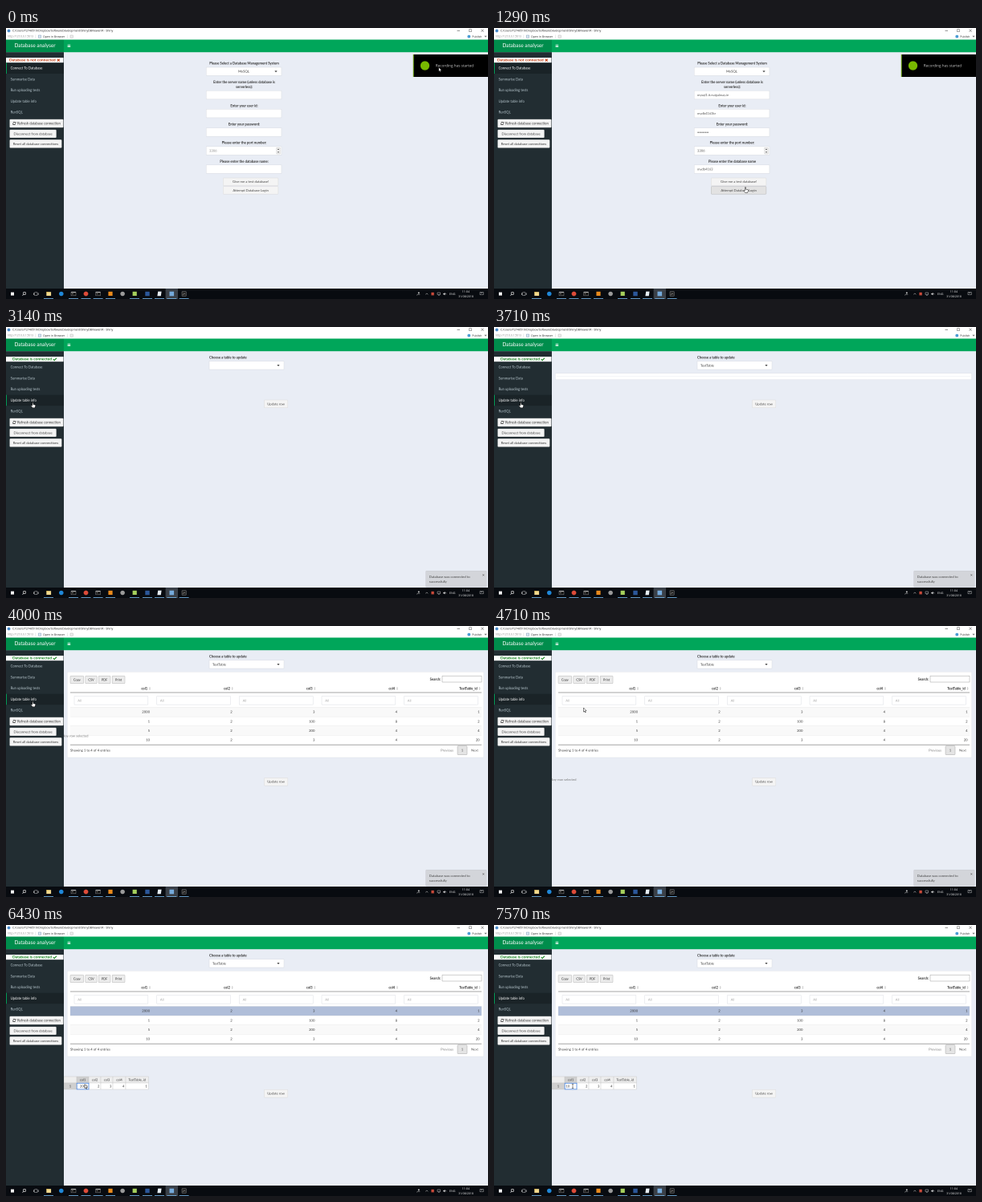
An HTML page with a canvas for the animation above (8000 ms loop, 600x338 px).

```html
<!DOCTYPE html>
<html lang="en">
<head>
<meta charset="utf-8">
<title>Database analyser</title>
<style>
html, body { margin: 0; width: 100%; height: 100%; overflow: hidden; background: #e9edf5; }
canvas { display: block; width: 600px; height: 338px; }
</style>
</head>
<body>
<canvas id="stage"></canvas>
<script>
const LOOP = 8000, STEP = 1000 / 7, SCALE = 2;
const canvas = document.getElementById('stage');
canvas.width = 600 * SCALE;
canvas.height = 338 * SCALE;
const c = canvas.getContext('2d');

const UI = 'Lato, "Open Sans", sans-serif', SYS = '"Open Sans", "Noto Sans", sans-serif';
const INK = '#333', BACK = '#e9edf5', GREEN = '#00a65a', DARK = '#222d32';

function rect(x, y, w, h, color) {
  c.fillStyle = color;
  c.fillRect(x, y, w, h);
}
function box(x, y, w, h, fill, stroke, r = 0) {
  c.beginPath();
  c.roundRect(x, y, w, h, r);
  if (fill) { c.fillStyle = fill; c.fill(); }
  if (stroke) { c.strokeStyle = stroke; c.lineWidth = 0.4; c.stroke(); }
}
function disc(x, y, r, color) {
  c.fillStyle = color;
  c.beginPath();
  c.arc(x, y, r, 0, 7);
  c.fill();
}
function poly(pts, fill, stroke, width = 0.5) {
  c.beginPath();
  pts.forEach(([x, y], i) => i ? c.lineTo(x, y) : c.moveTo(x, y));
  if (fill) { c.closePath(); c.fillStyle = fill; c.fill(); }
  if (stroke) { c.strokeStyle = stroke; c.lineWidth = width; c.stroke(); }
}
// Type is laid out large and scaled down so that letter spacing stays exact.
function text(s, x, y, { size = 4.2, color = INK, align = 'left', bold = false, font = UI } = {}) {
  c.save();
  c.translate(x, y + size * 0.33);
  c.scale(0.1, 0.1);
  c.font = `${bold ? 'bold ' : ''}${size * 10}px ${font}`;
  c.textAlign = align;
  c.fillStyle = color;
  c.fillText(s, 0, 0);
  c.restore();
}
const label = (s, x, y, align = 'center') => text(s, x, y, { bold: true, align });
function button(s, x, y, w, h, { fill = '#f4f4f4', edge = '#d5d5d5', color = '#444', size = 4.2 } = {}) {
  box(x, y, w, h, fill, edge, 0.8);
  text(s, x + w / 2, y + h / 2, { align: 'center', color, size });
}
function caret(x, y, color = INK) {
  poly([[x - 1.6, y - 0.8], [x + 1.6, y - 0.8], [x, y + 1.1]], color);
}

function titleBar() {
  rect(0, 0, 600, 14.5, '#fff');
  disc(3.5, 3.5, 1.9, '#4a8ac9');
  text('C:/Users/T2740519/Dropbox/SoftwareDevelopment/ShinyDBViewer/R - Shiny', 8, 3.3, { size: 3.5, font: SYS, color: '#222' });
  rect(561.5, 3.2, 3.5, 0.5, '#333');
  box(576.5, 1.7, 3, 3, null, '#333');
  poly([[591.5, 1.7], [594.7, 4.9]], null, '#333');
  poly([[594.7, 1.7], [591.5, 4.9]], null, '#333');
  text('http://127.0.0.1:5013', 2, 10.6, { size: 3.3, font: SYS, color: '#888' });
  rect(36.7, 8.5, 0.4, 4.5, '#ccc');
  box(40.2, 9, 3.6, 3.2, '#dce7f2', '#6f8eac');
  text('Open in Browser', 46, 10.6, { size: 3.5, font: SYS });
  rect(76, 8.5, 0.4, 4.5, '#ccc');
  box(80, 9, 3.4, 3.2, '#eee', '#aaa');
  disc(576.3, 10.6, 1.9, '#4a9bd4');
  text('Publish', 580.3, 10.6, { size: 3.5, font: SYS });
  caret(597, 10.6, '#777');
}

function header() {
  rect(72, 14.5, 528, 15.7, GREEN);
  rect(0, 14.5, 72, 15.7, '#008d4c');
  text('Database analyser', 36, 22, { size: 6.4, color: '#fff', align: 'center' });
  for (let i = 0; i < 3; i++) rect(76.6, 20.7 + i * 1.3, 3.6, 0.7, '#fff');
}

function sidebar(n) {
  rect(0, 30.2, 72, 294.8, DARK);
  rect(0, 37, 71.5, 6.2, '#fff');
  if (n < 10) {
    const red = '#c63d12';
    text('Database is not connected', 4, 40, { size: 4.9, bold: true, color: red });
    poly([[63.8, 38.6], [66.8, 41.6]], null, red, 1);
    poly([[66.8, 38.6], [63.8, 41.6]], null, red, 1);
  } else {
    const ok = '#13851b';
    text('Database is connected', 8, 40, { size: 4.9, bold: true, color: ok });
    poly([[58.8, 40.2], [60.2, 41.6], [63, 38.6]], null, ok, 1.1);
  }
  const active = n < 21 ? 0 : 3;
  ['Connect To Database', 'Summarise Data', 'Run uploading tests', 'Update table info', 'RunSQL'].forEach((s, i) => {
    const y = 50.2 + i * 13.75;
    const lit = i === active || (i === 3 && n >= 15 && n < 31);
    if (lit) {
      rect(0, y - 6.8, 72, 13.6, '#1a2327');
      rect(0, y - 6.8, 0.9, 13.6, GREEN);
    }
    text(s, 5.6, y, { size: 4.25, color: lit ? '#fff' : '#b8c7ce' });
  });
  box(4.7, 114, 66.6, 10, '#f4f4f4', '#ddd', 0.8);
  c.strokeStyle = '#222';
  c.lineWidth = 0.7;
  for (const a of [0.3, 3.44]) {
    c.beginPath();
    c.arc(10.3, 119, 1.6, a, a + 2.4);
    c.stroke();
  }
  poly([[11, 118.6], [12.5, 118.6], [12.5, 117.1]], '#222');
  poly([[9.6, 119.4], [8.1, 119.4], [8.1, 120.9]], '#222');
  text('Refresh database connection', 14, 119, { size: 4.25 });
  button('Disconnect from database', 4.7, 127, 57.8, 9.8, { color: INK });
  button('Reset all database connections', 4.7, 139.4, 64.5, 10, { color: INK });
}

function loginPage(n) {
  const full = n >= 6;
  const field = (y, s, color = '#555') => {
    box(249.3, y, 93.6, 10.6, '#fff', '#d2d6de');
    text(s, 253, y + 5.4, { color, size: 4.1 });
  };
  label('Please Select a Database Management System', 296.5, 44);
  box(249.3, 49, 93.6, 10.4, '#fff', '#d2d6de');
  text('MySQL', 296, 54.2, { align: 'center' });
  caret(336, 54.2);
  label('Enter the server name (unless database is', 296.5, 67.8);
  label('serverless):', 296.5, 73.6);
  field(78.2, full ? 'mysql1.it.nuigalway.ie' : '');
  label('Enter your user id:', 296.5, 97);
  field(101.3, full ? 'mydb4163kr' : '');
  label('Enter your password:', 296.5, 120);
  field(124.6, full ? '••••••' : '');
  label('Please enter the port number:', 296.5, 143);
  field(147.8, '3306', full ? '#555' : '#888');
  box(336.8, 149.2, 4.4, 7.8, '#eee', '#bbb');
  poly([[338, 152], [340, 152], [339, 150.6]], '#333');
  poly([[338, 154.4], [340, 154.4], [339, 155.8]], '#333');
  label('Please enter the database name' + (full ? '' : ':'), 296.5, 166.4);
  field(170.8, full ? 'mydb4163' : '');
  const hover = { fill: '#e2e2e2', edge: '#adadad' };
  button('Give me a test database!', 270.3, 187, 68.6, 9.6, n >= 4 && n < 7 ? hover : {});
  button('Attempt Database Login', 270.3, 197.6, 68.6, 9.6, n >= 7 ? hover : {});
}

const COLS = [
  ['col1', 179, ['2000', '1', '5', '10']],
  ['col2', 281.7, ['2', '2', '2', '2']],
  ['col3', 384.4, ['3', '100', '200', '3']],
  ['col4', 487, ['4', '8', '4', '4']],
  ['TestTable_id', 589.6, ['1', '2', '4', '20']]
];

function dataTable(chosen) {
  box(76.3, 57.3, 518.4, 106.7, '#fff', '#dde0e6', 0.8);
  const small = { size: 3.9, fill: '#ececec', edge: '#aaa', color: '#222' };
  [['Copy', 80, 16.6], ['CSV', 98.8, 14.4], ['PDF', 115.2, 14.8], ['Print', 132.2, 15.8]]
    .forEach(([s, x, w]) => button(s, x, 62.2, w, 9.6, small));
  label('Search:', 541.3, 66.4, 'right');
  box(543, 62.2, 49, 7.8, '#fff', '#888');
  rect(80, 101.4, 512, 11.6, chosen ? '#b0bed9' : '#f9f9f9');
  rect(80, 124.7, 512, 11.6, '#f9f9f9');
  for (let i = 0; i < 4; i++) rect(80, 101.3 + i * 11.65, 512, 0.3, '#ddd');
  rect(80, 82.8, 512, 0.4, '#222');
  rect(80, 147.9, 512, 0.4, '#222');
  for (const [name, x, values] of COLS) {
    label(name, x - 2.8, 78, 'right');
    poly([[x - 0.9, 77.6], [x + 0.9, 77.6], [x, 75.9]], '#bbb');
    poly([[x - 0.9, 78.4], [x + 0.9, 78.4], [x, 80.1]], '#bbb');
    box(x - 94, 87.6, 91.8, 10.5, '#fff', '#d2d6de');
    text('All', x - 89.8, 93, { color: '#aaa', size: 4.1 });
    values.forEach((v, i) => text(v, x, 107.3 + i * 11.65, { align: 'right' }));
  }
  text('Showing 1 to 4 of 4 entries', 80, 155);
  text('Previous', 557, 155, { align: 'right', color: '#777' });
  button('1', 562, 149.6, 12, 11, { fill: '#e4e4e4', edge: '#999' });
  text('Next', 579, 155, { color: '#555' });
}

function rowTable(n) {
  const picked = n >= 44, edges = [72, 88, 103, 118, 133, 149, 177.4];
  const names = ['', 'col1', 'col2', 'col3', 'col4', 'TestTable_id'];
  const values = ['1', n < 46 ? '2000' : '', '2', '3', '4', '1'];
  names.forEach((s, i) => {
    const x = edges[i], w = edges[i + 1] - x;
    box(x, 189, w, 8, picked && i === 1 ? '#cfcfcf' : '#eee', '#c4c4c4');
    box(x, 197, w, 8, i ? '#fff' : picked ? '#cfcfcf' : '#eee', '#c4c4c4');
    text(s, x + w / 2, 193, { align: 'center', size: 4.1 });
    if (i) text(values[i], x + w - 1.6, 201, { align: 'right', size: 4.1 });
    else text('1', x + w / 2, 201, { align: 'center', size: 4.1 });
  });
  if (picked) {
    c.strokeStyle = '#4a86e0';
    c.lineWidth = 0.8;
    c.strokeRect(88.2, 197.3, 14.8, 7.6);
  }
  if (n >= 46) text(n < 53 ? '2000' : '10', 89.5, 201, { size: 4.1 });
}

function updatePage(n) {
  text('Choose a table to update', 253, 38, { bold: true });
  box(253, 42.6, 93, 10.4, '#fff', '#d2d6de');
  if (n >= 23) text('TestTable', 257, 47.9);
  caret(339, 47.9);
  let y = 91;
  if (n >= 28) {
    dataTable(n >= 35);
    y = n < 35 ? 189.4 : 205.3;
    if (n < 35) {
      c.save();
      c.beginPath();
      c.rect(72, 60, 200, 160);
      c.clip();
      text('Any row selected', 102.5, n < 31 ? 137 : 191.5, { align: 'right', color: '#777' });
      c.restore();
    } else rowTable(n);
  } else if (n >= 25) {
    box(76.3, 57.6, 518.4, 8.2, '#fff', '#d5d9e2', 0.8);
    rect(78, 61.6, 515, 0.3, '#dfe2ea');
  }
  button('Update row', 321.4, y, 29.4, 9.8);
}

function notice(n) {
  if (n < 11 || n >= 43) return;
  c.globalAlpha = n === 42 ? 0.4 : n === 41 ? 0.75 : 1;
  box(522.6, 304.2, 75.6, 20, '#d3d5da', '#c3c5ca', 0.8);
  text('Database was connected to', 526.8, 311.4, { color: '#444' });
  text('successfully', 526.8, 317.4, { color: '#444' });
  text('×', 594.3, 309.3, { size: 5, bold: true, align: 'center', color: '#555' });
  c.globalAlpha = 1;
}

function toast(n) {
  if (n > 15) return;
  const lime = '#78b900';
  const left = n < 14 ? 506.8 : n === 14 ? 548 : 592;
  rect(left, 33, 600 - left, 28, lime);
  const inner = n < 13 ? 508 : n === 13 ? 552 : 600;
  rect(inner, 33, 600 - inner, 28, '#000');
  if (n >= 13) return;
  for (let y = 33.5; y < 61; y += 2) rect(506.8, y, 1.2, 0.9, '#20320a');
  disc(521.5, 47, 5.6, lime);
  text('Recording has started', 534.8, 47.2, { size: 4.66, font: SYS, color: '#ccc' });
}

function taskbar() {
  rect(0, 325, 600, 13, '#080b10');
  rect(198.6, 325, 15.4, 13, '#3a4048');
  rect(6, 329.6, 4, 4, '#f2f2f2');
  c.strokeStyle = '#eee';
  c.lineWidth = 0.6;
  c.beginPath();
  c.arc(23, 331, 1.7, 0, 7);
  c.stroke();
  poly([[21.8, 332.3], [20.4, 333.8]], null, '#eee', 0.6);
  box(35.6, 329.8, 3.4, 3.8, null, '#eee');
  rect(34.3, 330.4, 0.6, 2.6, '#eee');
  rect(39.8, 330.4, 0.6, 2.6, '#eee');
  rect(50.3, 329.2, 5.8, 4.8, '#f2d98c');
  rect(50.3, 329, 2.4, 0.9, '#d9b44a');
  disc(68.8, 331.5, 2.8, '#1f87d8');
  for (const x of [84, 114.6]) {
    box(x - 3, 329.2, 6, 4.6, '#111', '#aaa');
    rect(x - 2.8, 329.2, 5.6, 0.9, '#ccc');
    rect(x - 2, 331.2, 1.8, 0.5, '#ddd');
  }
  disc(99.5, 331.5, 2.9, '#dd4b39');
  rect(127.4, 328.8, 5.2, 5.2, '#e98a1c');
  disc(145.1, 331.5, 2.8, '#9a9a9a');
  rect(157.6, 328.8, 5.2, 5.2, '#a5cf5c');
  rect(173.3, 328.8, 5.4, 5.4, '#2b579a');
  poly([[189.2, 328.6], [193.6, 328.6], [192.8, 334.3], [188.4, 334.3]], '#e6edf2');
  rect(203.5, 328.7, 5.6, 5.6, '#75aadb');
  box(219, 328.8, 5.2, 5.4, '#222', '#aaa');
  poly([[220, 333], [221.6, 331], [223.3, 332]], null, '#ddd', 0.4);
  for (const x of [53, 84, 99.5, 114.6, 130, 160, 176, 191, 206.3, 221.6]) rect(x - 6, 337.2, 12, 0.8, '#76b9ed');

  const sys = { size: 3.7, font: SYS, color: '#eee', align: 'center' };
  disc(513.8, 330.4, 1, '#ccc');
  poly([[511.3, 333.5], [512.3, 332.2], [515.3, 332.2]], null, '#ccc');
  poly([[522.3, 332.4], [523.8, 330.9], [525.3, 332.4]], null, '#eee');
  rect(529.4, 329.8, 3.4, 3.6, '#c94a3a');
  box(537, 330, 3.6, 2.6, null, '#eee');
  rect(538.2, 333.1, 1.4, 0.5, '#eee');
  poly([[544.4, 331], [545.3, 331], [546.5, 330], [546.5, 333.4], [545.3, 332.4], [544.4, 332.4]], '#eee');
  poly([[547.2, 331], [548.2, 332.2]], null, '#eee');
  text('ENG', 555.7, 331.7, sys);
  text('11:04', 572.4, 328.6, sys);
  text('31/08/2018', 572.6, 334.7, { ...sys, size: 3.5 });
  box(590, 329.4, 4.2, 3.4, null, '#eee');
  rect(591, 330.6, 2.2, 0.4, '#eee');
}

// Pointer tip: frame step, x, y
const PATH = [
  [0, 538.6, 49], [1, 478, 84], [2, 394, 142], [3, 330, 180], [4, 312.5, 188.5], [6, 312.5, 188.5],
  [7, 312.5, 198.6], [12, 312.5, 198.6], [13, 240, 168], [14, 122, 116], [15, 57.5, 88],
  [20, 36, 93], [21, 32.8, 94], [30, 32.8, 94], [31, 72, 98], [33, 151, 106], [39, 151, 106],
  [40, 151, 133], [43, 98, 198.5], [56, 98, 198.5]
];

function pointer(n) {
  const i = PATH.findIndex(p => p[0] > n) - 1;
  const [a, ax, ay] = PATH[i], [b, bx, by] = PATH[i + 1];
  const k = (n - a) / (b - a);
  c.save();
  c.translate(ax + (bx - ax) * k, ay + (by - ay) * k);
  if (n >= 46) {
    poly([[-1.2, 0.2], [1.2, 0.2]], null, '#111');
    poly([[0, 0.2], [0, 5]], null, '#111');
    poly([[-1.2, 5], [1.2, 5]], null, '#111');
  } else if ((n >= 4 && n < 13) || (n >= 15 && n < 31)) {
    poly([[0, 0], [0.9, 0], [1.1, 2.6], [3.6, 3.1], [3.9, 4.4], [3.1, 6.8], [0.2, 6.8],
      [-1.7, 4.2], [-1.3, 3.6], [-0.2, 4.3], [0, 0]], '#fff', '#111');
  } else {
    poly([[0, 0], [0, 5.2], [1.2, 4.2], [2, 6], [2.8, 5.6], [2, 3.9], [3.6, 3.8], [0, 0]], '#fff', '#111');
  }
  c.restore();
}

function draw(n) {
  c.setTransform(SCALE, 0, 0, SCALE, 0, 0);
  rect(0, 0, 600, 338, BACK);
  titleBar();
  header();
  if (n < 21) loginPage(n); else updatePage(n);
  sidebar(n);
  notice(n);
  toast(n);
  taskbar();
  pointer(n);
}

const start = performance.now();
function tick() {
  const t = Math.max(0, performance.now() - start) % LOOP;
  draw(Math.min(55, Math.floor((t + 3) / STEP)));
  requestAnimationFrame(tick);
}
tick();
</script>
</body>
</html>
```
